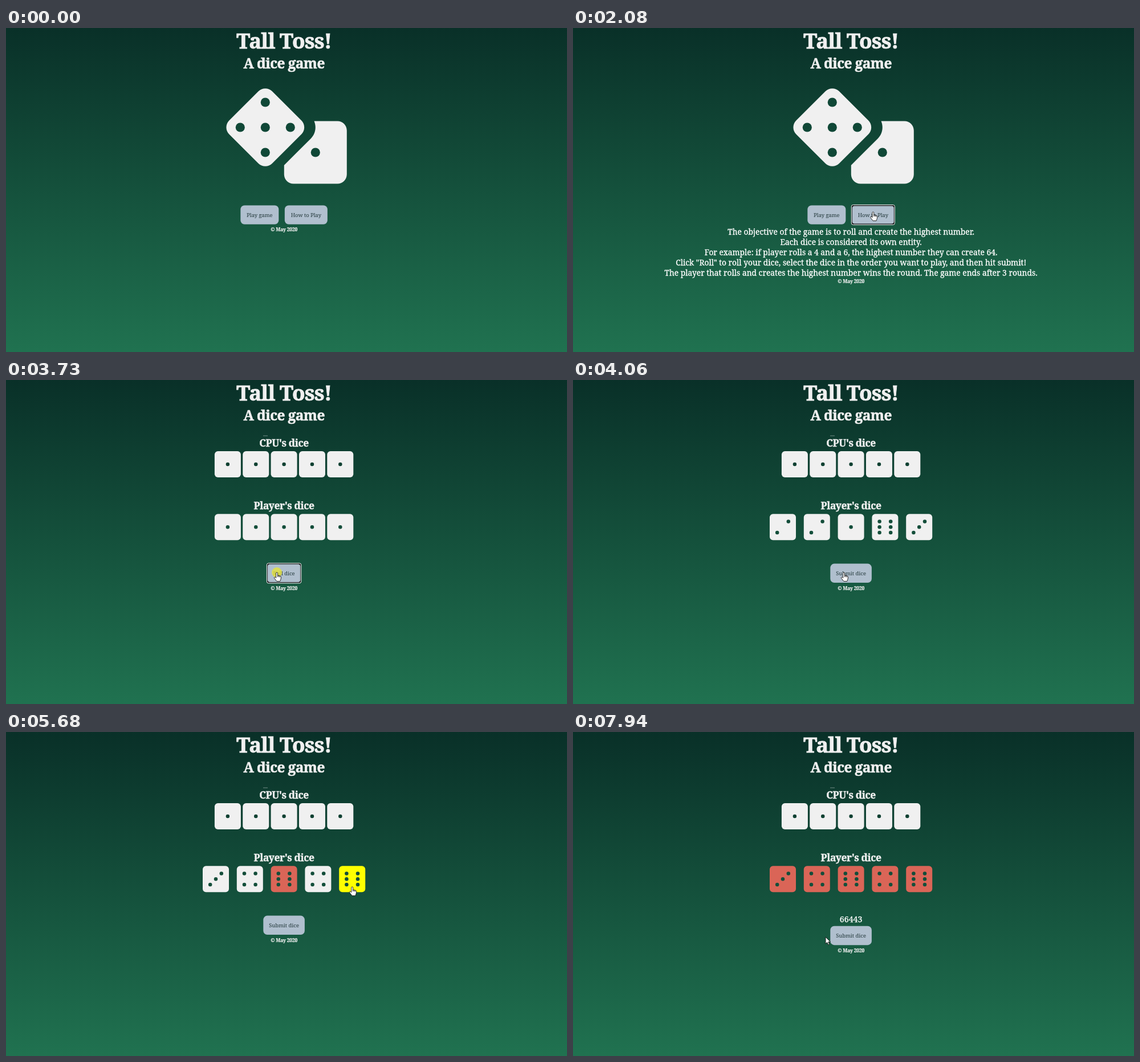
Write an HTML page that moves like this. It is 984 by 569 pixels and loops after 7990 ms.

```html
<!DOCTYPE html>
<html lang="en">
<head>
<meta charset="utf-8">
<title>Tall Toss!</title>
<style>
  html, body { margin: 0; width: 100%; height: 100%; overflow: hidden; background: #093028; }
  svg { display: block; width: 100vw; height: 100vh; }
  text {
    font-family: "Noto Serif", serif; text-anchor: middle;
    color: #fff; fill: currentColor; stroke: currentColor; stroke-width: .024em;
  }
  .bold { font-weight: 700; letter-spacing: -.025em; color: #f0f0f0; }
  .rules { font-size: 13.8px; }
  .label { font-size: 9.35px; color: #2f4447; stroke-width: .01em; }
  .button { fill: #b0bfce; }
  .bg { fill: url(#felt); }
  .die { fill: #f0f0f0; }
  .die.hover { fill: #ff0; }
  .die.picked { fill: #da6557; }
</style>
</head>
<body>
<svg viewBox="0 0 984 569" preserveAspectRatio="none">
  <defs>
    <linearGradient id="felt" gradientUnits="userSpaceOnUse" x1="0" y1="0" x2="0" y2="569">
      <stop offset="0" stop-color="#093028"/>
      <stop offset="1" stop-color="#207250"/>
    </linearGradient>
  </defs>
  <rect class="bg" width="984" height="569"/>
  <text class="bold" x="487.6" y="36" font-size="36.8">Tall Toss!</text>
  <text class="bold" x="487.6" y="71" font-size="24.5">A dice game</text>

  <g id="home">
    <g transform="translate(377.8 97.5) scale(.34375)">
      <g fill="#f0f0f0">
        <path d="M592 192H473.3c12.7 29.6 7.1 65.2-17 89.3L320 417.6V464c0 26.5 21.5 48 48 48h224c26.5 0 48-21.5 48-48V240c0-26.5-21.5-48-48-48z"/>
        <rect x="69" y="69" width="310" height="310" rx="49" transform="rotate(45 224 224)"/>
      </g>
      <g id="bigPips" fill="#104837"></g>
    </g>
    <g id="homeButtons"></g>
    <g id="rules"></g>
  </g>

  <g id="game">
    <path d="M451 98h8" stroke="#f0f0f0" stroke-opacity=".45"/>
    <text class="bold" x="487.6" y="116.7" font-size="17.5">CPU's dice</text>
    <text class="bold" x="487.6" y="227" font-size="17.5">Player's dice</text>
    <g id="cpuDice"></g>
    <g id="playerDice"></g>
    <text id="score" x="487.6" y="333.6" font-size="14.2">66443</text>
    <g id="gameButton"></g>
  </g>

  <text class="bold" id="copyright" x="487.6" font-size="8.6">© May 2020</text>

  <circle id="clickSpot" r="9" fill="#e6e43c" fill-opacity=".8"/>
  <g id="cursor" fill="#fff" stroke="#111" stroke-width=".9" stroke-linejoin="round">
    <path id="hand" d="M-1.4 1.2C-1.4-.5 1.4-.5 1.4 1.2V5l4.4 1.1C7.2 6.5 7.6 7.3 7.5 8.5L6.8 12.2 5.6 15.5H-.2L-4.3 10.2C-5.4 8.6-3.6 7.4-2.5 8.4L-1.4 9.6ZM1.4 5v3M3.5 5.6v2.6M5.6 6.2v2.4"/>
    <path id="arrow" d="M0 0V12l2.8-2.6 1.9 4.2 2-.9L4.8 8.7H8.5Z"/>
  </g>
</svg>
<script>
const LOOP = 7990, CENTER = 487.6;
const DIE = 46, IDLE_PITCH = 49.35, ROLLED_PITCH = 59.8, CPU_Y = 125, PLAYER_Y = 235.3;
const BUTTON_H = 33.4, LINE = 18.15;
const HOLD = 100, SETTLE = 200, ROLL_TIME = 520, ROLL_TICK = 50;
const rolled = [3, 4, 6, 4, 6];
const $ = id => document.getElementById(id);

// Layout
function buttonRow(y, ...items) {
  const gap = 10.5;
  let x = CENTER - (items.reduce((sum, b) => sum + b.w + gap, -gap)) / 2;
  return items.map(b => {
    const box = { ...b, x, y, h: BUTTON_H };
    x += b.w + gap;
    return box;
  });
}
const [play, how] = buttonRow(311.4, { label: 'Play game', w: 67 }, { label: 'How to Play', w: 75 });
const [roll] = buttonRow(322.6, { label: 'Roll dice', w: 59.4 });
const [submit] = buttonRow(322.6, { label: 'Submit dice', w: 72.6 });

const dieRow = (y, pitch) => rolled.map((_, i) =>
  ({ x: CENTER + (i - 2) * pitch - DIE / 2, y, w: DIE, h: DIE }));
const cpuRow = dieRow(CPU_Y, IDLE_PITCH);
const idleRow = dieRow(PLAYER_Y, IDLE_PITCH);
const rolledRow = dieRow(PLAYER_Y, ROLLED_PITCH);

// Pointer: rests at each stop, clicks there, then eases on to the next
const visit = (box, press, dx, dy, leave = press + HOLD) => ({
  x: box.x + box.w / 2 + dx, y: box.y + box.h / 2 + dy,
  arrive: press - SETTLE, press, release: press + HOLD, leave
});
const pick = (i, press) => ({ ...visit(rolledRow[i], press, 12 - 3 * i, 8.5 + 1.3 * i), die: i });
const rest = (x, arrive, leave) => ({ x, y: 360, arrive, leave });

const openRules = visit(how, 450, 0, -5, 2080);
const startGame = visit(play, 2620, 25, 6, 3320);
const rollDice = visit(roll, 3720, -12.5, -1.3, 4725);
const picks = [pick(2, 5020), pick(4, 5780), pick(3, 6190), pick(1, 6570), pick(0, 7020)];
const lastPick = picks[picks.length - 1];
const clicks = [openRules, startGame, rollDice, ...picks];
const stops = [
  { x: 951, y: 558, arrive: 0, leave: 50 }, ...clicks,
  rest(428, 7480, 7660), rest(421, 7700, 7710), rest(428, 7760, 7930), rest(443, 7940, LOOP)
];

const smooth = f => f * f * (3 - 2 * f);

function pointerAt(t) {
  const i = stops.findIndex(s => t < s.leave);
  const to = stops[i], from = stops[i - 1];
  if (!from || t >= to.arrive) return to;
  const f = smooth((t - from.leave) / (to.arrive - from.leave));
  return { x: from.x + (to.x - from.x) * f, y: from.y + (to.y - from.y) * f };
}

// Drawing
function pips(n) {
  const spots = n % 2 ? [[0, 0]] : [];
  if (n > 1) spots.push([1, -1], [-1, 1]);
  if (n > 3) spots.push([-1, -1], [1, 1]);
  if (n > 5) spots.push([-1, 0], [1, 0]);
  return spots;
}

function dieMarkup({ x, y }, face, state = '') {
  const dots = pips(face).map(([u, v]) =>
    `<circle class="bg" cx="${x + DIE / 2 + u * 9.8}" cy="${y + DIE / 2 + v * 9.8}" r="3.25"/>`);
  return `<rect class="die ${state}" x="${x}" y="${y}" width="${DIE}" height="${DIE}" rx="5.8"/>` + dots.join('');
}

function buttonMarkup({ x, y, w, h, label }, focused) {
  const ring = focused
    ? `<rect x="${x - .5}" y="${y - .8}" width="${w + 1}" height="${h + 1.6}" rx="3" fill="#101010" stroke="#fff"/>`
    : '';
  const inset = focused ? 1 : 0;
  return ring +
    `<rect class="button" x="${x + inset}" y="${y + inset}" width="${w - 2 * inset}" height="${h - 2 * inset}" rx="${7 - 3 * inset}"/>` +
    `<text class="label" x="${x + w / 2}" y="${y + 20.2}">${label}</text>`;
}

const show = (id, on) => { $(id).style.display = on ? '' : 'none'; };
const hits = (p, b) => p.x >= b.x && p.x <= b.x + b.w && p.y >= b.y && p.y <= b.y + b.h;
const random = seed => {
  const s = Math.sin(seed * 127.1) * 43758.5453;
  return s - Math.floor(s);
};

function playerDie(i, t, pointer) {
  const spin = t - rollDice.release;
  if (spin < 0) return dieMarkup(idleRow[i], 1);
  if (spin < ROLL_TIME) {
    const seed = Math.floor(spin / ROLL_TICK) * rolled.length + i + 1;
    return dieMarkup(rolledRow[i], 1 + Math.floor(random(seed) * 6));
  }
  const picked = picks.some(p => p.die === i && t >= p.release);
  const state = picked ? 'picked' : hits(pointer, rolledRow[i]) ? 'hover' : '';
  return dieMarkup(rolledRow[i], rolled[i], state);
}

function render(t) {
  const done = click => t >= click.release;
  const inGame = done(startGame), scored = done(lastPick), ruled = done(openRules);
  const pointer = pointerAt(t);
  let targets = [play, how];

  show('home', !inGame);
  show('game', inGame);
  show('rules', ruled);
  show('score', scored);
  if (inGame) {
    const button = done(rollDice) ? { ...submit, y: submit.y + (scored ? LINE : 0) } : roll;
    targets = [button, ...(t >= rollDice.release + ROLL_TIME ? rolledRow : [])];
    $('playerDice').innerHTML = rolled.map((_, i) => playerDie(i, t, pointer)).join('');
    $('gameButton').innerHTML = buttonMarkup(button, t >= rollDice.press && !done(rollDice));
  } else {
    const playFocus = t >= startGame.press;
    $('homeButtons').innerHTML = buttonMarkup(play, playFocus) + buttonMarkup(how, ruled && !playFocus);
  }
  const lines = inGame ? +scored : ruled ? 5 : 0;
  $('copyright').setAttribute('y', (inGame ? 368.5 : 357.3) + lines * LINE);

  const hovering = targets.some(b => hits(pointer, b));
  for (const id of ['cursor', 'clickSpot']) {
    $(id).setAttribute('transform', `translate(${pointer.x} ${pointer.y})`);
  }
  show('cursor', t >= stops[0].leave);
  show('hand', hovering);
  show('arrow', !hovering);
  show('clickSpot', clicks.some(c => t >= c.press && !done(c)));
}

$('bigPips').innerHTML = [[0, 0], [-1, 0], [1, 0], [0, -1], [0, 1], [2, 1]]
  .map(([u, v]) => `<circle cx="${224 + u * 128}" cy="${224 + v * 128}" r="23.5"/>`).join('');
$('cpuDice').innerHTML = cpuRow.map(box => dieMarkup(box, 1)).join('');
$('rules').innerHTML = [
  'The objective of the game is to roll and create the highest number.',
  'Each dice is considered its own entity.',
  'For example: if player rolls a 4 and a 6, the highest number they can create 64.',
  'Click "Roll" to roll your dice, select the dice in the order you want to play, and then hit submit!',
  'The player that rolls and creates the highest number wins the round. The game ends after 3 rounds.'
].map((line, i) => `<text class="rules" x="${CENTER}" y="${362.7 + i * LINE}">${line}</text>`).join('');

const start = performance.now();
function frame() {
  render((performance.now() - start) % LOOP);
  requestAnimationFrame(frame);
}
frame();
</script>
</body>
</html>
```
